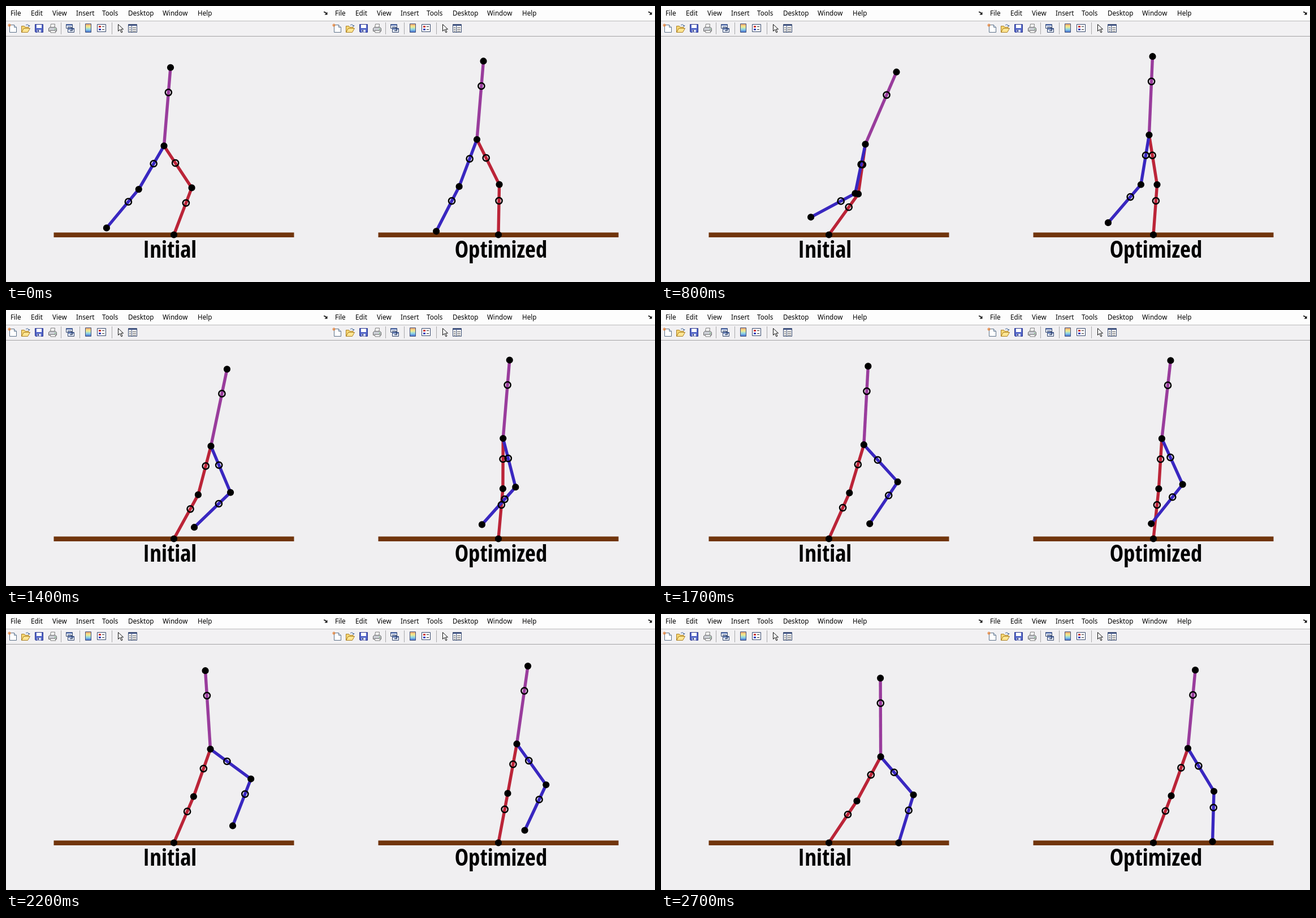
These frames come from a looping animation (1148x488 px, 2800 ms). An HTML page:

```html
<!DOCTYPE html>
<html lang="en">
<head>
<meta charset="utf-8">
<title>Walker gait comparison</title>
<style>
  html, body { margin: 0; width: 100%; height: 100%; overflow: hidden; background: #f0eff1; }
  svg { display: block; width: 100vw; height: 100vh; }
  .menu { font: 11.7px "Segoe UI", "Open Sans", "Noto Sans", sans-serif; }
  .caption {
    font: 900 41px Impact, "Open Sans Condensed", "Roboto Condensed", Roboto, sans-serif;
    font-stretch: condensed; text-anchor: middle;
  }
  .limb { fill: none; stroke-width: 5.4; stroke-linejoin: round; }
  .rings { fill: none; stroke: #000; stroke-width: 2.5; }
  .dots { fill: none; stroke: #000; stroke-width: 12.2; stroke-linecap: round; }
</style>
</head>
<body>
<svg id="stage" viewBox="0 0 1148 488"></svg>
<script>
const MENU = { File: 8, Edit: 44, View: 82, Insert: 124, Tools: 170, Desktop: 216, Window: 277, Help: 339 };
const LEG = 88.9, TORSO = 139, FOOT = [297, 404.5];
const STEP = 100, STEPS = 28;
const KEYS = [0, 4, 8, 12, 17, 22, 27];

// Segment angles in degrees from the vertical, one value per key step
const walkers = [
  { name: 'Initial', mid: 289.5,
    shank: [20.8, 33.8, 35.8, 32.2, 24.1, 23.1, 33.8],
    thigh: [-33.5, -8.1, 8.1, 13, 16.7, 19.5, 28.3],
    torso: [4.75, 20.9, 23.3, 17.4, 3.1, -3.7, -0.2],
    swingThigh: [-30.2, -30.7, -11.7, 9, 42.3, 53.7, 40.7],
    swingShank: [-39.8, -59.5, -61.9, -53.7, -33.8, -21.2, -17.1] },
  { name: 'Optimized', mid: 301.5,
    shank: [1, 3.2, 4.2, 4.8, 6.1, 10.7, 20.8],
    thigh: [-26.4, -19.05, -9.1, -2.25, 3.55, 10.4, 19.35],
    torso: [4.75, 3.5, 2.5, 3.7, 6.4, 8.1, 5.4],
    swingThigh: [-20.7, -18.75, -9.4, 6.8, 24.4, 35.6, 31.2],
    swingShank: [-27.1, -34.5, -40.7, -42.5, -38.6, -25.1, -1.6] }
];

const icons = `
  <g stroke-width="1">
    <path d="M6.5 33.5h8l4 4v9h-12z" fill="#fff" stroke="#5b7088"/>
    <path d="M14.5 33.5v4h4" fill="#dce6f2" stroke="#5b7088"/>
    <path d="M6 31v6M3 34h6M4 32l4 4M8 32l-4 4" stroke="#e5843a"/>
    <path d="M27.5 46.5v-11h5l1.500 2h6v3" fill="#f7d774" stroke="#a97d20"/>
    <path d="M27.500 46.500l4-7h11l-4 7z" fill="#ffe694" stroke="#a97d20"/>
    <path d="M35 34q4-3 6 2m-2-1l2 1 1-2" fill="none" stroke="#3a5f92"/>
    <path d="M51.500 32.500h14v14h-13l-1-1z" fill="#5366c8" stroke="#2b358c"/>
    <path d="M54 33h9v6h-9z" fill="#fff"/>
    <path d="M55 42h7v4.500h-7z" fill="#d8def2"/><path d="M56 42.500h2v3h-2z" fill="#263078"/>
    <path d="M78.500 39l1-7h7l-1 7z" fill="#fff" stroke="#777"/>
    <path d="M75.500 39.500l2-2h10l2 2v5h-14z" fill="#c9cbd2" stroke="#666"/>
    <path d="M78 43.500h9l1 3.500h-9z" fill="#fff" stroke="#777"/><path d="M86 41h2" stroke="#3a3"/>
    <path d="M106.500 32.500h11v7h-11zM109.500 39.500h11v7h-11z" fill="#e9eef8" stroke="#35476c"/>
    <path d="M107 33.500h10M110 40.500h10" stroke="#4b69ad" stroke-width="2"/>
    <path d="M109 37.500h5q3 0 3 3v3h-4" fill="none" stroke="#35476c" stroke-width="1.600"/>
    <path d="M140.500 31.500h10v15h-10z" fill="url(#bar)" stroke="#414e75"/>
    <path d="M161.500 32.500h15v13h-15z" fill="#fff" stroke="#35476c"/>
    <path d="M164 35h4v3h-4z" fill="#c33"/><path d="M164 40h4v3h-4z" fill="#34b"/>
    <path d="M170 36.500h4M170 41.500h4" stroke="#333"/>
    <path d="M198.500 32.500v12l3-3 2.500 5.500 2-1-2.500-5h4z" fill="#fff" stroke="#111"/>
    <path d="M216.500 32.500h15v14h-15z" fill="#fff" stroke="#35476c"/>
    <path d="M217 34h14" stroke="#46598a" stroke-width="2"/>
    <path d="M222.500 35v11" stroke="#35476c"/>
    <path d="M218 38.500h3M218 41.500h3M218 44.500h3M224 38.500h6M224 41.500h6M224 44.500h6" stroke="#555"/>
    <path d="M97.500 29v21M130.500 29v21M187.500 29v21" stroke="#a9a9ab"/>
    <path d="M562 10.500q3 0 5 3" fill="none" stroke="#111" stroke-width="1.400"/>
    <path d="M568.500 10.500v5h-5z" fill="#111"/>
  </g>`;

const panel = (w, i) => `
  <g transform="translate(${i * 574})">
    <path d="M0 0h574v26H0z" fill="#fdfdfd"/>
    <path d="M0 26.500h574" stroke="#b9b9bb"/>
    <path d="M0 27h574v26H0z" fill="#f2f1f3"/>
    <path d="M0 53.500h574" stroke="#a3a3a5"/>
    ${Object.entries(MENU).map(([t, x]) => `<text class="menu" x="${x}" y="17">${t}</text>`).join('')}
    ${icons}
    <path d="M84.500 400.500h425v8.500h-425z" fill="#71350c"/>
    <text class="caption" x="${w.mid}" y="445">${w.name}</text>
    <path class="limb" stroke="#993c9c"/>
    <path class="limb" stroke="#bb2438"/>
    <path class="limb" stroke="#3927c0"/>
    <path class="rings"/><path class="dots"/>
  </g>`;

const stage = document.getElementById('stage');
stage.innerHTML = `<defs><linearGradient id="bar" x2="0" y2="1">
  <stop stop-color="#f0a070"/><stop offset=".35" stop-color="#f4ec8c"/>
  <stop offset=".65" stop-color="#8fd8e8"/><stop offset="1" stop-color="#4468d0"/>
  </linearGradient></defs>` + walkers.map(panel).join('');
const paths = [...stage.querySelectorAll(':scope > g')]
  .map(g => [...g.querySelectorAll('.limb, .rings, .dots')]);

// Cubic through the four keys around step s
function angleAt(values, s) {
  const next = KEYS.findIndex(k => k > s);
  const first = next < 0 ? 3 : Math.max(0, Math.min(3, next - 2));
  let sum = 0;
  for (let i = first; i < first + 4; i++) {
    let weight = 1;
    for (let j = first; j < first + 4; j++)
      if (j !== i) weight *= (s - KEYS[j]) / (KEYS[i] - KEYS[j]);
    sum += weight * values[i];
  }
  return sum * Math.PI / 180;
}

const swing = ([x, y], a, len) => [x + len * Math.sin(a), y + len * Math.cos(a)];
const rise = ([x, y], a, len) => [x + len * Math.sin(a), y - len * Math.cos(a)];
const mix = (p, q, f) => p.map((v, i) => v + (q[i] - v) * f);
const line = pts => 'M' + pts.join('L');
const dot = p => `M${p}h.01`;
const ring = ([x, y]) => `M${x - 5.6} ${y}a5.6 5.6 0 1 0 11.2 0a5.6 5.6 0 1 0 -11.2 0z`;

function pose(w, s) {
  const at = part => angleAt(w[part], s);
  const knee = rise(FOOT, at('shank'), LEG);
  const hip = rise(knee, at('thigh'), LEG);
  const head = rise(hip, at('torso'), TORSO);
  const knee2 = swing(hip, at('swingThigh'), LEG);
  const foot2 = swing(knee2, at('swingShank'), LEG);
  const centres = [mix(hip, head, .682), mix(hip, knee, .41), mix(knee, FOOT, .323),
    mix(hip, knee2, .41), mix(knee2, foot2, .323)];
  return [
    line([hip, head]), line([hip, knee, FOOT]), line([hip, knee2, foot2]),
    centres.map(ring).join(''), [FOOT, knee, hip, head, knee2, foot2].map(dot).join('')
  ];
}

const start = performance.now();
function draw() {
  const s = Math.floor(Math.max(0, performance.now() - start) / STEP) % STEPS;
  walkers.forEach((w, i) => pose(w, s).forEach((d, k) => paths[i][k].setAttribute('d', d)));
  requestAnimationFrame(draw);
}
draw();
</script>
</body>
</html>
```
